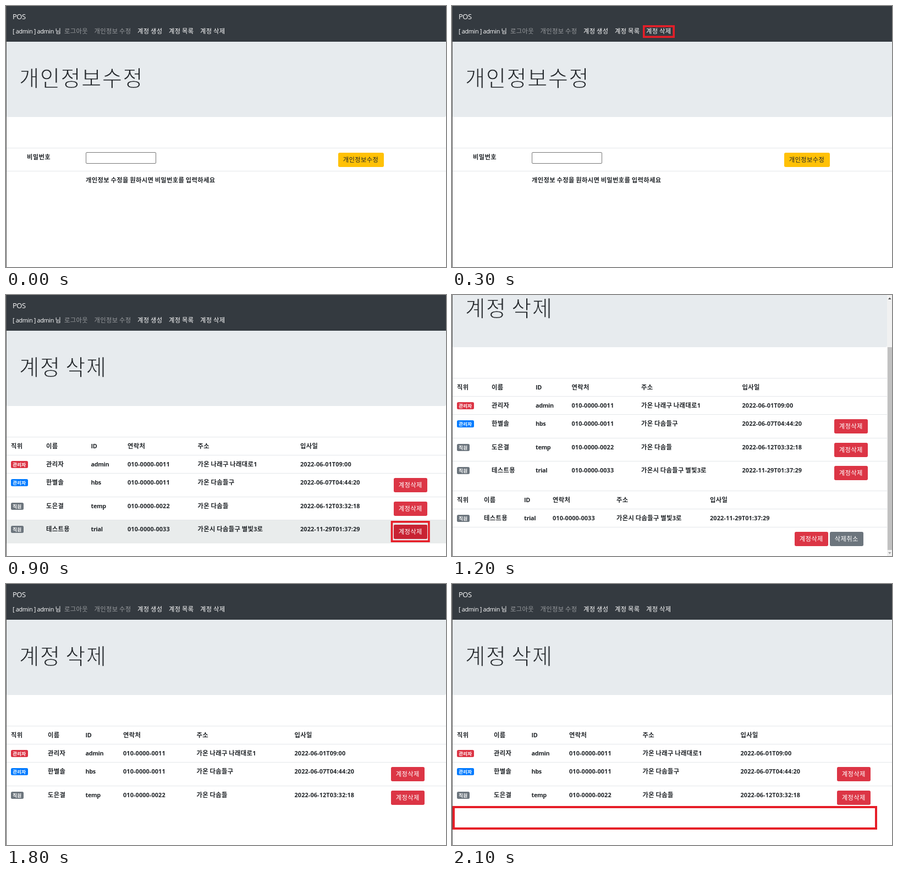
An HTML page for the animation above (2.4 s loop, 800x475 px).

```html
<!DOCTYPE html>
<html lang="ko">
<head>
<meta charset="utf-8">
<style>
html, body { margin: 0; width: 100%; height: 100%; overflow: hidden; background: #fff; }
svg { display: block; width: 800px; height: 475px; }
text { font-family: 'Open Sans', 'Noto Sans CJK KR', 'Noto Sans CJK', sans-serif; white-space: pre; letter-spacing: -.03em; }
.ko { font-family: 'Noto Sans CJK KR', 'Noto Sans CJK', sans-serif; font-size: 1.04em; letter-spacing: .033em; }
.num { letter-spacing: .012em; }
</style>
</head>
<body>
<svg id="stage" viewBox="0 0 800 475"></svg>
<script>
const LOOP = 2400;
const INK = '#212529', DARK = '#343a40', LINE = '#e4e7ea', PANEL = '#e7ebee', HOVER = '#e9ecec';
const RED = '#dc3545', PRESSED = '#c82333', BLUE = '#007bff', GRAY = '#6c757d', YELLOW = '#ffc107', MARK = '#e61e28';
const SIZE = 10.85;

const rect = (x, y, w, h, fill, r = 0) =>
  `<rect x="${x}" y="${y}" width="${w}" height="${h}" rx="${r}" fill="${fill}"/>`;

// Hangul, digits and Latin words each get their own spacing.
function text(x, y, str, { size = SIZE, weight = 700, fill = INK, extra = '' } = {}) {
  const runs = str.match(/[가-힣]+|[^가-힣]+/g).map(run => {
    const kind = /[가-힣]/.test(run) ? 'ko' : /\d/.test(run) ? 'num' : 'en';
    return `<tspan class="${kind}">${run}</tspan>`;
  });
  return `<text x="${x}" y="${y}" font-size="${size}" font-weight="${weight}" fill="${fill}" ${extra}>${runs.join('')}</text>`;
}

const button = (x, y, w, label, fill, color = '#fff') =>
  rect(x, y, w, 26, fill, 2.7) + text(x + 8.8, y + 17, label, { weight: 400, fill: color });

const badge = (x, y, label, fill) =>
  rect(x, y, 7 + label.length * 8, 13, fill, 2.5) +
  text(x + 3.2, y + 9.5, label, { size: 8.13, fill: '#fff' });

const marker = (x, y, w, h, s = 3.6) =>
  `<rect x="${x + s / 2}" y="${y + s / 2}" width="${w - s}" height="${h - s}" fill="none" stroke="${MARK}" stroke-width="${s}"/>`;

const edge = rect(0, 0, 1, 475, '#555');

const nav = [
  [12, '[ admin ] admin 님', '#fff'],
  [106, '로그아웃', '#999c9f'],
  [160.5, '개인정보 수정', '#999c9f'],
  [239, '계정 생성', '#fff'],
  [296, '계정 목록', '#fff'],
  [353, '계정 삭제', '#fff']
];

// The title is thinned by an outline in the panel colour.
function head(title, dy = 0, width = 800) {
  return rect(0, 60 + dy, width, 142, PANEL, 3.2) +
    rect(0, dy, width, 65, DARK) +
    text(12, 24 + dy, 'POS', { size: 12.9, weight: 400, fill: '#fff' }) +
    nav.map(([x, label, fill]) => text(x, 50 + dy, label, { weight: 400, fill })).join('') +
    text(24, 146 + dy, title, { size: 38, weight: 400, extra: `stroke="${PANEL}" stroke-width="1.1"` });
}

const HEADER = ['직위', '이름', 'ID', '연락처', '주소', '입사일'];
const ACCOUNTS = [
  ['관리자', '관리자', 'admin', '010-0000-0011', '가온 나래구 나래대로1', '2022-06-01T09:00'],
  ['관리자', '한별솔', 'hbs', '010-0000-0011', '가온 다솜들구', '2022-06-07T04:44:20'],
  ['직원', '도은결', 'temp', '010-0000-0022', '가온 다솜들', '2022-06-12T03:32:18'],
  ['직원', '테스트용', 'trial', '010-0000-0033', '가온시 다솜들구 별빛3로', '2022-11-29T01:37:29']
];
const BADGES = [RED, BLUE, GRAY, GRAY];
const ROW_TOPS = [33, 66, 109, 151];

function row(i, y, cols, width) {
  const [role, ...cells] = ACCOUNTS[i];
  return rect(0, y, width, 1, LINE) + badge(9, y + 11, role, BADGES[i]) +
    cells.map((c, k) => text(cols[k + 1], y + 21, c)).join('');
}

const header = (y, cols, width) =>
  rect(0, y, width, 1, LINE) + HEADER.map((h, k) => text(cols[k], y + 21, h)).join('');

function table(y, cols, count, buttonX, width = 800) {
  let out = header(y, cols, width);
  for (let i = 0; i < count; i++) {
    const top = y + ROW_TOPS[i];
    out += row(i, top, cols, width);
    if (i) out += button(buttonX, top + 9, 61, '계정삭제', RED);
  }
  return out;
}

function scrollbar() {
  return rect(791, 0, 9, 475, '#f1f1f1') + rect(792, 95, 8, 369, '#c1c1c1') +
    '<path d="M793 8l2.8-3.4 2.8 3.4z" fill="#505050"/>' +
    '<path d="M793 468l2.8 3.4 2.8-3.4z" fill="#a3a3a3"/>';
}

const passwordPage = head('개인정보수정') +
  rect(0, 258, 800, 1, LINE) + rect(0, 300, 800, 1, LINE) +
  text(38, 279, '비밀번호') +
  '<rect x="145.5" y="266.5" width="127" height="20" rx="1.5" fill="#fff" stroke="#767676"/>' +
  button(604, 267, 83, '개인정보수정', YELLOW, INK) +
  text(145, 321, '개인정보 수정을 원하시면 비밀번호를 입력하세요');

const wide = [9, 73, 154.5, 221, 348.5, 535];
const scrolled = [9, 72, 152, 217.5, 344, 527.5];
const chosen = [9, 58, 131, 183, 299, 469];
const shorter = [9, 76, 144.5, 213, 346.5, 524.5];

const confirmPage = head('계정 삭제', -107, 791) +
  table(151, scrolled, 4, 695, 791) +
  header(356, chosen, 791) + row(3, 389, chosen, 791) +
  rect(0, 422, 791, 1, LINE);
const confirmButtons = button(623, 431, 61, '계정삭제', RED) +
  button(687, 431, 61, '삭제취소', GRAY) + scrollbar();

// [start ms, end ms, drawing], painted in order
const layers = [
  [0, 600, passwordPage],
  [300, 600, marker(347, 35, 58, 23)],
  [600, 1200, head('계정 삭제')],
  [900, 1200, rect(0, 409, 800, 43, HOVER)],
  [600, 1200, table(258, wide, 4, 705)],
  [900, 1200, button(705, 418, 61, '계정삭제', PRESSED) + marker(699.7, 411, 71, 39)],
  [1200, 1800, confirmPage],
  [1500, 1800, rect(0, 422, 791, 43, HOVER)],
  [1200, 1800, confirmButtons],
  [1500, 1800, button(623, 431, 61, '계정삭제', PRESSED) + marker(619.2, 427, 70, 34)],
  [1800, 2400, head('계정 삭제') + table(258, shorter, 3, 700)],
  [2100, 2400, marker(1, 404, 772, 43, 4)]
];

const stage = document.getElementById('stage');
stage.innerHTML = layers.map(([, , art]) => `<g>${art}</g>`).join('') + edge;

const start = document.timeline.currentTime;
layers.forEach(([from, to], i) => {
  const steps = [[from, 1]];
  if (from > 0) steps.unshift([0, 0]);
  if (to < LOOP) steps.push([to, 0]);
  steps.push([LOOP, 0]);
  const anim = stage.children[i].animate(
    steps.map(([ms, opacity]) => ({ offset: ms / LOOP, opacity, easing: 'step-end' })),
    { duration: LOOP, iterations: Infinity }
  );
  anim.startTime = start;
});
</script>
</body>
</html>
```
